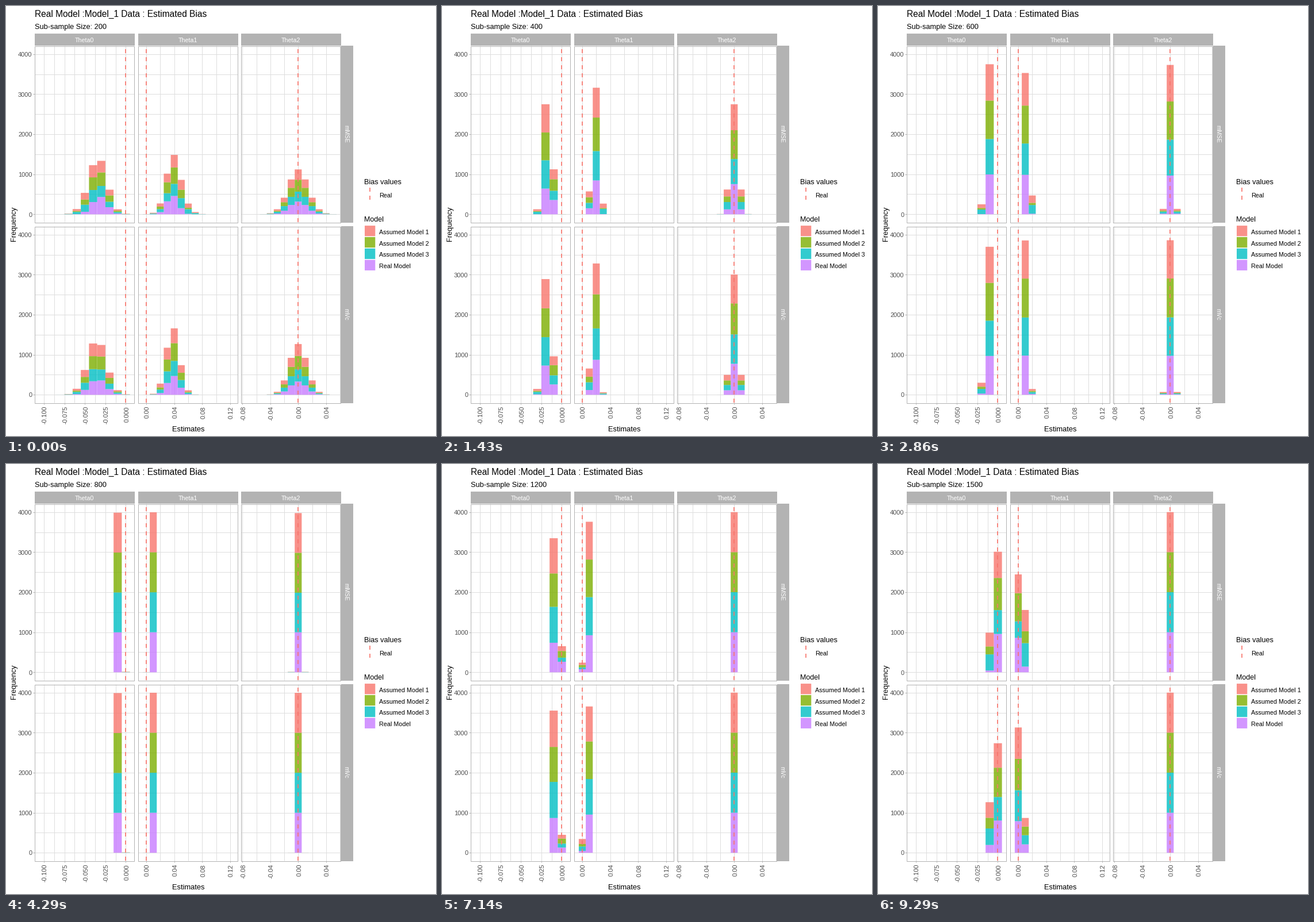
A matplotlib script for the animation above (10000 ms loop, 748 by 748 pixels).

```python
import math
import numpy as np
import matplotlib.pyplot as plt
from matplotlib.animation import FuncAnimation
from matplotlib.collections import PolyCollection
from matplotlib.patches import Rectangle

SIDE, DPI = 748, 100
PX = 72 / DPI
LOOP, TICK = 10000, 40
plt.rcParams["font.family"] = "Liberation Sans"

SIZES = range(200, 1501, 100)
MODELS = ["Real Model", "Assumed Model 3", "Assumed Model 2", "Assumed Model 1"]
COLORS = ["#C77CFF", "#00BFC4", "#7CAE00", "#F8766D"]
GREY, GRID, RED, INK = "#B3B3B3", "#DEDEDE", "#F8766D", "#4D4D4D"

# Column: left, right, x of zero, bin width, bins per tick, first tick, tick labels
COLS = [
    (50, 223, 208.5, 14.25, 2.5, -4, ["-0.100", "-0.075", "-0.050", "-0.025", "0.000"]),
    (230, 403, 244, 12.17, 4, 0, ["0.00", "0.04", "0.08", "0.12"]),
    (409, 582, 508.3, 12.13, 4, -2, ["-0.08", "-0.04", "0.00", "0.04"]),
]
# Row: top, bottom, y of zero, label
ROWS = [(69, 376, 362.3, "mMSE"), (383, 690, 676.3, "mVc")]
Y_UNIT = 0.06965

# Bias and noise strength of each model, by (row, column)
BIAS = {
    (0, 0): (-644, -728, -684, -715), (1, 0): (-689, -730, -701, -726),
    (0, 1): (680, 760, 705, 747), (1, 1): (695, 687, 693, 683),
    (0, 2): (0, 0, 0, 0), (1, 2): (0, 0, 0, 0),
}
NOISE = {
    (0, 0): (2400, 3500, 3000, 3400), (1, 0): (2750, 3500, 3050, 3300),
    (0, 1): (2200, 3600, 2600, 3500), (1, 1): (2200, 2800, 2350, 2850),
    (0, 2): (3450, 4500, 3700, 4300), (1, 2): (3300, 3600, 3300, 3700),
}
CURVE = (0, 20, 0)   # extra small-sample bias of each column
EDGES = np.arange(-10.5, 12)


def counts(n, row, col):
    """Bin counts per model: normal, mean falling as 1/n, deviation as n^-1.5."""
    out = []
    for bias, noise in zip(BIAS[row, col], NOISE[row, col]):
        mean = bias / n * (1 + CURVE[col] / n)
        dev = noise / n ** 1.5
        below = [math.erf((e - mean) / (dev * math.sqrt(2))) for e in EDGES]
        out.append(500 * np.diff(below))
    return np.array(out)


def bars(n):
    polys = [[] for _ in MODELS]
    for c, (_, _, zero, width, *_) in enumerate(COLS):
        xs = zero + EDGES * width
        for r, (_, _, base, _) in enumerate(ROWS):
            heights = np.cumsum(counts(n, r, c), axis=0) * Y_UNIT
            lows = np.full(len(xs) - 1, base)
            for poly, tops in zip(polys, base - heights):
                for x0, x1, low, top in zip(xs, xs[1:], lows, tops):
                    if low - top > .02:
                        poly.append([(x0, low), (x1, low), (x1, top), (x0, top)])
                lows = tops
    return polys


fig = plt.figure(figsize=(SIDE / DPI, SIDE / DPI), dpi=DPI, facecolor="white")
ax = fig.add_axes([0, 0, 1, 1])
ax.set_xlim(0, SIDE)
ax.set_ylim(SIDE, 0)
ax.axis("off")


def text(x, y, s, size, color="black", ha="left", rot=0):
    return ax.text(x, y, s, fontsize=size * PX, color=color, ha=ha, va="baseline",
                   rotation=rot, rotation_mode="anchor")


def line(xs, ys, color, z, width=1, **kw):
    ax.plot(xs, ys, color=color, lw=width * PX, zorder=z,
            solid_capstyle="butt", dash_capstyle="butt", **kw)


def box(x0, y0, x1, y1, z=1, **kw):
    ax.add_patch(Rectangle((x0, y0), x1 - x0, y1 - y0, zorder=z, **kw))


def dashed(x, bottom, top):
    line([x, x], [bottom, top], RED, 4, 1.7, dashes=(7 / 1.7, 7 / 1.7))


def draw_panel(col, row):
    left, right, zero, width, step, first, labels = COLS[col]
    top, bottom, base, _ = ROWS[row]
    for i in np.arange(-5, 5, .5):
        x = zero + i * step * width
        if left + 1 < x < right:
            line([x, x], [top, bottom], GRID, 1)
    for v in range(0, 4001, 500):
        y = base - v * Y_UNIT
        line([left, right], [y, y], GRID, 1)
        if col == 0 and v % 1000 == 0:
            line([left - 3, left], [y, y], GREY, 1)
            text(left - 4.5, y + 4.2, str(v), 11, INK, "right")
    if row == 1:
        for i, label in enumerate(labels):
            x = zero + (first + i) * step * width
            line([x, x], [bottom, bottom + 3], GREY, 1)
            text(x + 5, 696, label, 11.1, INK, "right", 90)
    box(left + .5, top + .5, right + .5, bottom + .5, 5, fill=False, ec=GREY, lw=PX)
    dashed(zero, bottom, top)


for c, (left, right, *_) in enumerate(COLS):
    box(left, 48, right + 1, 69, fc=GREY, lw=0)
    text((left + right) / 2, 63, f"Theta{c}", 10.6, "white", "center")
    for r in range(len(ROWS)):
        draw_panel(c, r)
for top, bottom, _, name in ROWS:
    box(583, top, 604, bottom + 1, fc=GREY, lw=0)
    text(588.5, (top + bottom) / 2, name, 10.2, "white", "center", -90)

text(50, 19, "Real Model :Model_1 Data : Estimated Bias", 15.5)
subtitle = text(50, 40, "", 12.8)
text(317, 740, "Estimates", 12.9, ha="center")
text(17, 379, "Frequency", 12.8, ha="center", rot=90)

text(623, 310, "Bias values", 12.6)
dashed(632.8, 337, 316)
text(649, 333, "Real", 10.75)
text(623, 375, "Model", 12.5)
for i, (name, color) in enumerate(zip(MODELS[::-1], COLORS[::-1])):
    y = 382.1 + 19.85 * i
    box(624, y, 642.3, y + 18.3, fc=color, lw=0, alpha=.8, snap=False)
    text(649, y + 14.6, name, 10.75)

stacks = [PolyCollection([], facecolors=c, linewidths=0, alpha=.8, zorder=3, snap=False)
          for c in COLORS]
for s in stacks:
    ax.add_collection(s, autolim=False)

FRAMES = LOOP // TICK
states = [bars(n) for n in SIZES]


def update(i):
    # The size shown is the one reached by the end of the tick
    step = (len(SIZES) * (i + 1) - 1) // FRAMES
    subtitle.set_text(f"Sub-sample Size: {SIZES[step]}")
    for s, polys in zip(stacks, states[step]):
        s.set_verts(polys)
    return [subtitle, *stacks]


anim = FuncAnimation(fig, update, frames=FRAMES, interval=TICK,
                     repeat=True, repeat_delay=0, blit=False)
plt.show()
```
